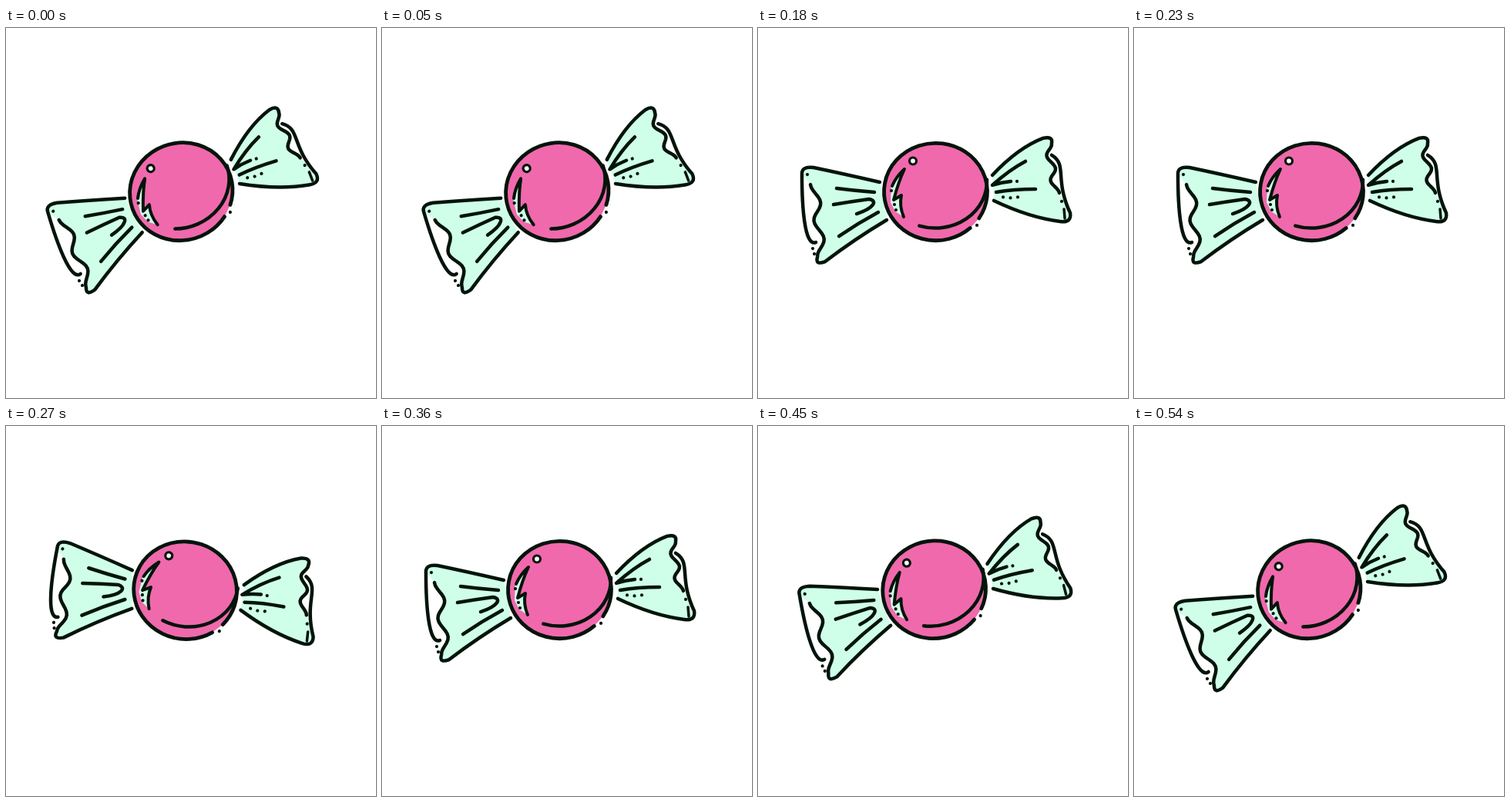
An HTML page for the animation above (630 ms loop, 480x480 px).

```html
<!DOCTYPE html>
<html lang="en">
<head>
<meta charset="utf-8">
<title>Rocking candy</title>
<style>
  html, body { margin: 0; width: 100%; height: 100%; overflow: hidden; background: #fff; }
  svg { display: block; width: 100vw; height: 100vh; }
</style>
</head>
<body>
<svg viewBox="0 0 480 480"><g id="candy" stroke-linecap="round" stroke-linejoin="round"></g></svg>
<script>
const INK = '#03140b', PINK = '#f069ac', MINT = '#d0ffe9';
const STEP = 90, POSES = 7;
const candy = document.getElementById('candy');

function add(tag, attrs) {
  const el = document.createElementNS('http://www.w3.org/2000/svg', tag);
  for (const k in attrs) el.setAttribute(k, attrs[k]);
  candy.append(el);
}

const fill = (d, color) => add('path', { d, fill: color });
const stroke = (d, width = 4.5) => add('path', { d, fill: 'none', stroke: INK, 'stroke-width': width });
const dot = (cx, cy) => add('circle', { cx, cy, r: 2.1, fill: INK });

// Torn paper edge: two scallops from (x0,y0) to (x1,y1), bulging sideways by depth.
function ripple(x0, y0, x1, y1, depth) {
  let d = '';
  for (let i = 0; i <= 24; i++) {
    const t = i / 24, bulge = depth * (1 - Math.cos(4 * Math.PI * t)) / 2;
    d += `L${x0 + (x1 - x0) * t + bulge},${y0 + (y1 - y0) * t}`;
  }
  return d;
}

// Clockwise elliptical arc between two angles in degrees.
function arc(cx, cy, rx, ry, from, to) {
  const at = deg => {
    const a = deg * Math.PI / 180;
    return `${cx + rx * Math.cos(a)},${cy + ry * Math.sin(a)}`;
  };
  return `M${at(from)}A${rx},${ry} 0 ${to - from > 180 ? 1 : 0} 1 ${at(to)}`;
}

function leftWing() {
  const top = 'M158,200Q110,189 72,181Q56,179 57,190';
  const edge = ripple(68, 203, 77, 297, 11);
  const bottom = 'Q74,308 87,303Q125,274 167,249';
  fill(top + edge + bottom, MINT);
  stroke(top + 'C57,230 60,284 75,278');
  stroke('M' + edge.slice(1) + bottom);
  dot(64, 190);
  dot(71, 286);
  dot(73, 293);
  stroke('M102,208Q125,211 151,213');
  stroke('M98,229Q122,225 144,222C156,224 150,234 128,241');
  stroke('M105,270Q130,253 156,239');
}

function rightWing() {
  const top = 'M304,191Q338,155 370,143Q383,140 381,150' + ripple(381, 150, 391, 214, -9);
  const corner = 'Q407,253 392,251Q352,246 306,224';
  fill(top + 'L405,240' + corner, MINT);
  stroke(top);
  stroke('M381,165C402,178 384,195 405,240' + corner);
  stroke('M397,235L398,247', 3.5);
  dot(394, 225);
  stroke('M347,173Q326,184 304,204Q316,200 328,199');
  stroke('M309,213Q331,209 360,209');
  dot(336, 199);
  for (let i = 0; i < 3; i++) dot(318 + 9.5 * i, 219.5 + i % 2);
}

function ball() {
  const rim = arc(230.5, 212.5, 67, 63.2, 48, 393);
  fill(rim, PINK);
  fill('M190,183L173,204L172,226L178,238L189,245L185,230L186,217L176,223Z', MINT);
  stroke(rim, 4.8);
  dot(284, 256);
  stroke(arc(230, 199, 67, 60.5, -2, 108));
  stroke('M174,205Q179,193 190,183Q182,200 176,223L186,217Q183,231 189,245', 4);
  dot(173, 211);
  dot(177, 229);
  dot(179, 236);
  add('circle', { cx: 201, cy: 172.5, r: 4.5, fill: '#fff', stroke: INK, 'stroke-width': 3.2 });
}

leftWing();
rightWing();
ball();

// Swings one way and back in held poses, gaining speed away from the first.
function draw(time) {
  const pose = Math.floor(time / STEP) % POSES, last = (POSES - 1) / 2;
  const swing = 1 - Math.abs(pose - last) / last;
  const angle = -16.4 + 27.4 * swing ** 1.27;
  candy.setAttribute('transform', `rotate(${angle} 228 223.5)`);
}

const start = performance.now();
function tick() {
  draw(performance.now() - start);
  requestAnimationFrame(tick);
}
tick();
</script>
</body>
</html>
```
